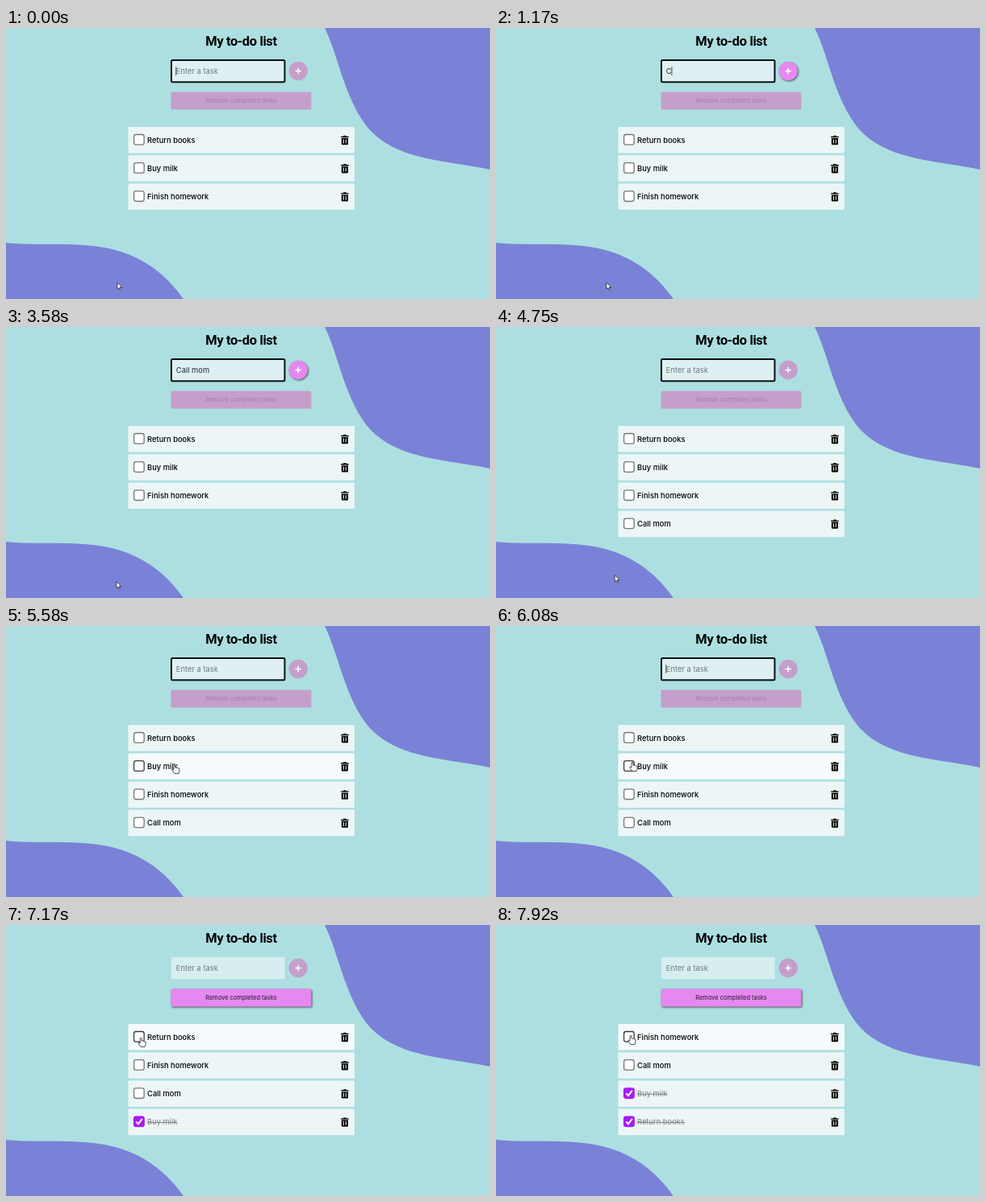
Write an HTML page that moves like this. It is 600x337 px and loops after 8000 ms.

```html
<!DOCTYPE html>
<html lang="en">
<head>
<meta charset="utf-8">
<title>My to-do list</title>
<style>
  html, body { margin: 0; width: 100%; height: 100%; overflow: hidden; background: #addfe1; }
  svg { display: block; width: 100%; height: 100%; font: 400 9.4px Inter, sans-serif; }
  .blob { fill: #7a82d7; }
  .title { font: 700 16.5px Roboto, sans-serif; font-stretch: 75%; letter-spacing: -.4px; text-anchor: middle; }
  .field { fill: #d6eef0; }
  .focused .field { fill: #def0f1; stroke: #0b1114; stroke-width: 2; }
  .button { fill: #c49fcb; }
  .on .button { fill: #e588f0; filter: drop-shadow(1.6px 1.6px 1px rgba(0, 0, 0, .6)); }
  .plus { stroke: #fff; stroke-width: 1.5; }
  .label { font-size: 7.46px; text-anchor: middle; fill: #a47cae; }
  .on .label { fill: #261a29; }
  .card { fill: #edf6f7; }
  .box { fill: #fff; stroke: #777; stroke-width: 1.3; }
  .name { font-weight: 500; fill: #000; }
  .tick { fill: none; stroke: #fff; stroke-width: 2; visibility: hidden; }
  .hover .card { fill: #f6fafc; }
  .hover .box { stroke: #3c3c3c; }
  .done .box { fill: #a81cf5; stroke: #a81cf5; }
  .done .tick { visibility: visible; }
  .done .name { font-weight: 400; fill: #7c8082; text-decoration: line-through; }
  .pointer { fill: #fff; stroke: #222; stroke-width: .8; stroke-linejoin: round; }
</style>
</head>
<body>
<svg viewBox="0 0 600 337" preserveAspectRatio="none">
  <path class="blob" d="M395 0C412 33 420 92 452 128C487 164 540 164 600 176V0Z"/>
  <path class="blob" d="M0 267C40 272 100 263 145 279C180 291 203 313 220 337H0Z"/>
  <text class="title" x="291.5" y="22">My to-do list</text>

  <g id="input">
    <rect class="field" x="205" y="40" width="140.5" height="27.3" rx="1.5"/>
    <text id="entry" x="210.8" y="57"/>
    <path id="caret" d="M0 48V59" stroke="#222" stroke-width=".8"/>
  </g>
  <g id="add">
    <circle class="button" cx="362.3" cy="53.5" r="11.7"/>
    <path class="plus" d="M358.6 53.5h7.4M362.3 49.8v7.4"/>
  </g>
  <g id="clear">
    <rect class="button" x="204.5" y="79.5" width="174" height="22" rx="1.5"/>
    <text class="label" x="291.5" y="93.2">Remove completed tasks</text>
  </g>

  <g id="list"></g>

  <path id="arrow" class="pointer" d="M0 0V8.2L1.9 6.5L3.2 9.4L4.5 8.8L3.2 6H5.8Z"/>
  <path id="hand" class="pointer" d="M-1 1Q0-.6 1 1V4.2Q2 3.4 2.8 4.5Q3.8 3.8 4.5 4.9Q6 4.6 6 6V8.5L5 11.6H0L-3 7.6Q-3.6 6-2.2 6.2L-1 7.2Z"/>
</svg>
<script>
const LOOP = 8000, TEXT_X = 210.8, ROW_TOP = 123, ROW_STEP = 35.2;
const HINT = 'Enter a task';
const $ = id => document.getElementById(id);

// [time, entry text]; the caret restarts its blink at each step
const typing = [
  [-420, ''], [80, ''], [1170, 'C'], [1920, 'Ca'], [2170, 'Cal'], [2330, 'Call'],
  [2500, 'Call '], [2670, 'Call m'], [2830, 'Call mo'], [2920, 'Call mom'], [3920, '']
];

// [time, task order, number of completed tasks at the end]
const lists = [
  [0, ['Return books', 'Buy milk', 'Finish homework'], 0],
  [3920, ['Return books', 'Buy milk', 'Finish homework', 'Call mom'], 0],
  [6170, ['Return books', 'Finish homework', 'Call mom', 'Buy milk'], 1],
  [7500, ['Finish homework', 'Call mom', 'Buy milk', 'Return books'], 2]
];

const linear = p => p;
const easeOut = p => 1 - (1 - p) ** 2;
const easeInOut = p => p * p * (3 - 2 * p);
// [time, x, y, easing towards this point]
const path = [
  [0, 138, 316.5], [329, 138, 316.5, linear], [330, 137, 316.5, linear], [4500, 137, 316.5, linear],
  [4750, 147, 309, linear], [5330, 209, 172, easeOut], [5580, 209, 172, linear],
  [6000, 169, 169, easeInOut], [6830, 169, 169, linear], [7250, 167, 137, easeInOut],
  [LOOP, 167, 137, linear]
];

const latest = (steps, t) => steps.filter(step => step[0] <= t).pop();

function pointerAt(t) {
  const i = path.findIndex(point => point[0] > t);
  const [t0, x0, y0] = path[i - 1], [t1, x1, y1, ease] = path[i];
  const p = ease((t - t0) / (t1 - t0));
  return [x0 + (x1 - x0) * p, y0 + (y1 - y0) * p];
}

const rows = {};
for (const name of lists[1][1]) {
  const row = document.createElementNS('http://www.w3.org/2000/svg', 'g');
  row.innerHTML = `
    <rect class="card" x="151.5" width="280.5" height="32.6" rx="1.5"/>
    <rect class="box" x="158.6" y="9.5" width="12.6" height="12.6" rx="2.4"/>
    <path class="tick" d="M161.3 16L164 18.8L168.8 12.4"/>
    <text class="name" x="175" y="19.9">${name}</text>
    <path d="M415.2 11.8H418L418.6 10.8H421.4L422 11.8H424.8V13.2H415.2Z
      M415.9 14H424.1V21Q424.1 22.2 422.9 22.2H417.1Q415.9 22.2 415.9 21Z"/>
    <path d="M418.6 15.5V20.5M421.4 15.5V20.5" stroke="#edf6f7"/>`;
  $('list').append(row);
  rows[name] = row;
}

function show(element, visible) {
  element.style.visibility = visible ? 'visible' : 'hidden';
}

function drawInput(t, focused, active) {
  const [since, text] = latest(typing, t);
  const entry = $('entry');
  entry.textContent = text || HINT;
  entry.setAttribute('fill', text ? '#22282b' : '#74797c');
  entry.style.whiteSpace = 'pre';
  const caretX = TEXT_X + (text ? entry.getComputedTextLength() + .3 : 0);
  $('caret').setAttribute('transform', `translate(${caretX})`);
  show($('caret'), focused && Math.floor((t - since) / 500) % 2 === 0);
  $('input').classList.toggle('focused', focused);
  $('add').classList.toggle('on', text !== '');
  $('clear').classList.toggle('on', active);
}

function drawList(order, done, x, y) {
  let hovering = false;
  for (const name in rows) {
    const index = order.indexOf(name), row = rows[name];
    const top = ROW_TOP + index * ROW_STEP;
    const hover = index >= 0 && x > 151 && x < 432 && y > top && y < top + 32.6;
    hovering ||= hover;
    show(row, index >= 0);
    row.style.display = index < 0 ? 'none' : '';
    row.setAttribute('transform', `translate(0 ${top})`);
    row.classList.toggle('hover', hover);
    row.classList.toggle('done', index >= order.length - done);
  }
  return hovering;
}

function draw(t) {
  const [, order, done] = latest(lists, t);
  const [x, y] = pointerAt(t);
  drawInput(t, done === 0, done > 0);
  const hovering = drawList(order, done, x, y);
  for (const id of ['arrow', 'hand']) $(id).setAttribute('transform', `translate(${x} ${y})`);
  show($('arrow'), !hovering);
  show($('hand'), hovering);
}

const start = performance.now();
function tick() {
  draw((performance.now() - start) % LOOP);
  requestAnimationFrame(tick);
}
tick();
</script>
</body>
</html>
```
